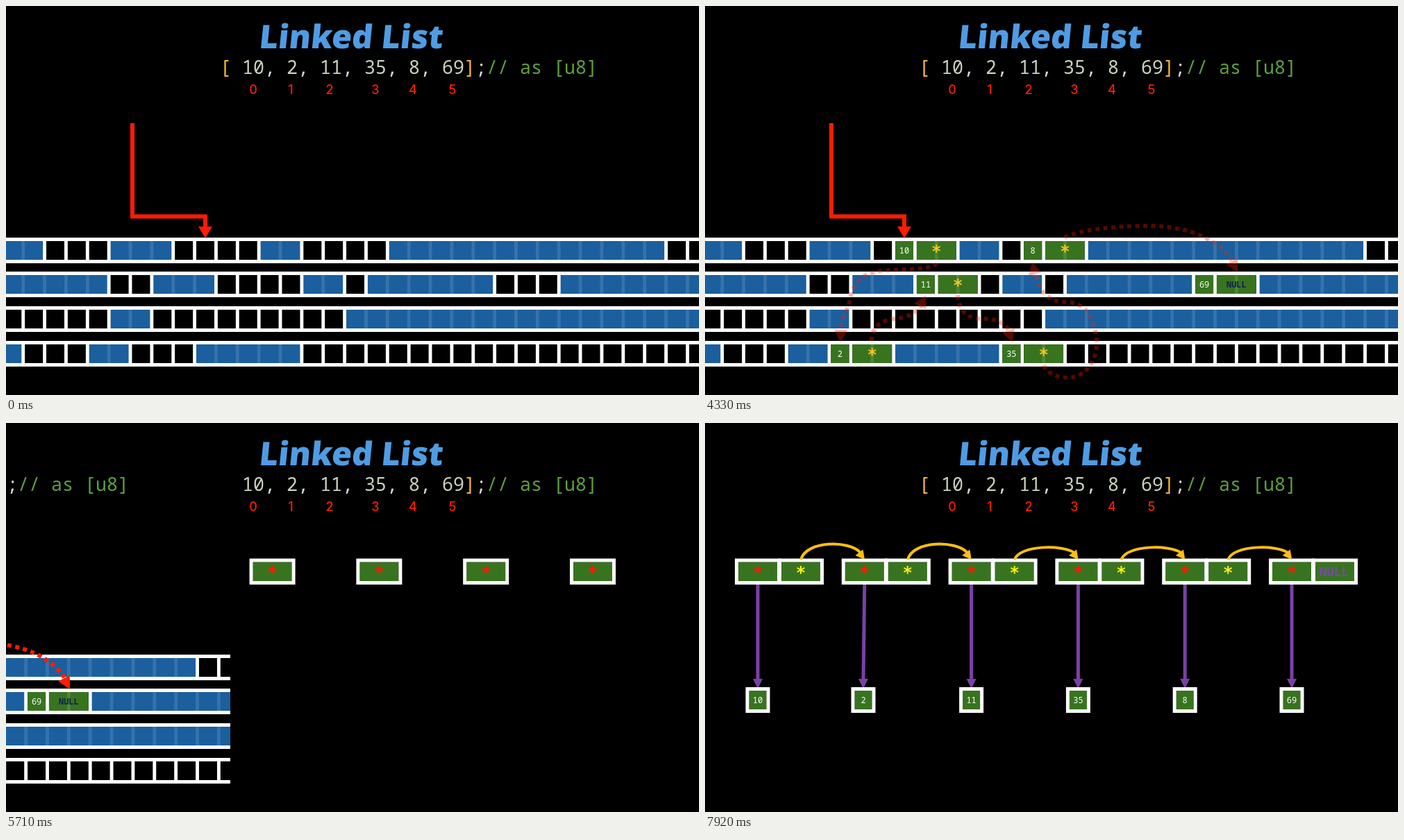
An HTML page with a canvas for the animation above (8000 ms loop, 998 by 561 pixels).

```html
<!DOCTYPE html>
<html lang="en">
<head>
<meta charset="utf-8">
<title>Linked List</title>
<style>
html, body { margin: 0; height: 100%; overflow: hidden; background: #000; }
canvas { display: block; }
</style>
</head>
<body>
<canvas id="stage" width="998" height="561"></canvas>
<script>
const W = 998, H = 561, LOOP = 8000, FADE = 400;
const ctx = document.getElementById('stage').getContext('2d');
const MONO = '"Noto Sans Mono", "DejaVu Sans Mono", monospace';
const RED = '#ff1c02', GREEN = '#38741f', BLUE = '#1b5f9e', PURPLE = '#7b40a8', GOLD = '#ffbf10';
const VALUES = [10, 2, 11, 35, 8, 69];

const clamp = v => Math.max(0, Math.min(1, v));
const fade = (t, start) => clamp((t - start) / FADE);

function rect(x, y, w, h, color) {
  ctx.fillStyle = color;
  ctx.fillRect(x, y, w, h);
}

function text(str, x, y, font, color, align = 'center') {
  ctx.font = font;
  ctx.fillStyle = color;
  ctx.textAlign = align;
  ctx.fillText(str, x, y);
}

const star = (x, y, color) => text('*', x, y + 12, 'bold 24px "DejaVu Sans Mono", monospace', color);
const value = (v, x, y) => text(v, x, y, `12px ${MONO}`, '#fff');

function line(path, color, width, dash = []) {
  ctx.strokeStyle = color;
  ctx.lineWidth = width;
  ctx.setLineDash(dash);
  ctx.stroke(new Path2D(path));
}

// Triangle with its tip at x, y, pointing along the angle in degrees
function head(x, y, angle, length, width, color) {
  ctx.save();
  ctx.translate(x, y);
  ctx.rotate(angle * Math.PI / 180);
  ctx.fillStyle = color;
  ctx.fill(new Path2D(`M0,0 L${-length},${-width / 2} V${width / 2}Z`));
  ctx.restore();
}

function withAlpha(alpha, draw) {
  if (!alpha) return;
  ctx.globalAlpha = alpha;
  draw();
  ctx.globalAlpha = 1;
}

// Title, array literal and its indices, shared by both slides
function header() {
  ctx.save();
  ctx.transform(1, 0, -0.1, 1, 496, 61);
  text('Linked List', 0, 0, '800 47px "Open Sans", "Noto Sans", sans-serif', '#4f9ce4');
  ctx.restore();
  const code = '[ 10, 2, 11, 35, 8, 69];// as [u8]';
  [...code].forEach((ch, i) => {
    const color = i > 23 ? '#5da13d' : '[]'.includes(ch) ? '#fdb827'
      : /\d/.test(ch) ? '#cad4bf' : '#d8d8d8';
    text(ch, 308 + 16 * i, 98, `26.67px ${MONO}`, color, 'left');
  });
  [356, 410, 466, 532, 586, 643].forEach((x, i) =>
    text(i, x, 127, '500 18px Inter, sans-serif', RED));
}

// Memory rows: alternating run lengths, used (blue) first, then free (black)
const ROWS = [
  { y: 334, runs: [2, 3, 3, 4, 2, 4, 13, 2] },
  { y: 383, runs: [5, 2, 3, 4, 2, 1, 6, 3, 7] },
  { y: 433, runs: [0, 5, 2, 9, 17] },
  { y: 483, runs: [1, 3, 2, 3, 5, 19] }
];
const PITCH = 30.86, CELL = 26;
const cellX = i => -3.7 + PITCH * i;

function block(row, i, n, color) {
  const y = ROWS[row].y + 5;
  rect(cellX(i), y, PITCH * (n - 1) + CELL, 27, color);
  for (let k = 1; k < n; k++)
    rect(cellX(i + k) - PITCH + CELL, y, PITCH - CELL, 27, 'rgba(255,255,255,.12)');
}

function memory() {
  ROWS.forEach(({ y, runs }, row) => {
    rect(0, y, W, 37, '#fff');
    let i = 0;
    runs.forEach((n, k) => {
      if (k % 2) for (let c = 0; c < n; c++) block(row, i + c, 1, '#000');
      else if (n) block(row, i, n, BLUE);
      i += n;
    });
  });
}

// Row and first cell of each list node
const NODES = [[0, 9], [3, 6], [1, 10], [3, 14], [0, 15], [1, 23]];

function nodes() {
  NODES.forEach(([row, i], k) => {
    const y = ROWS[row].y, mid = cellX(i + 1) + (PITCH + CELL) / 2;
    block(row, i, 1, GREEN);
    block(row, i + 1, 2, GREEN);
    value(VALUES[k], cellX(i) + CELL / 2, y + 23);
    if (k < 5) star(mid, y + 16, '#ffc617');
    else text('NULL', mid, y + 23, `bold 12px ${MONO}`, '#0c2252');
  });
}

// Path, then tip and angle of the arrow head
const LINKS = [
  ['M334,371 C330,378 305,379 285,380 C250,382 235,382 222,396 C206,412 212,425 203,440 C198,448 196,458 195,466', 195, 485, 92],
  ['M240,483 C240,462 255,452 275,451 C295,448 303,443 311,432', 318, 417, -64],
  ['M364,417 C366,440 378,450 395,451 C415,450 430,455 437,467', 443, 485, 70],
  ['M488,518 C492,530 508,536 522,536 C548,536 566,512 564,480 C560,445 545,428 522,427 C495,427 484,415 476,387', 471, 369, -104],
  ['M518,334 C535,324 585,317 640,317 C700,318 740,338 759,367', 767, 384, 62]
];

function links() {
  for (const [path, x, y, angle] of LINKS) {
    line(path, RED, 6, [6, 5.5]);
    head(x, y, angle, 18, 19, RED);
  }
}

function memorySlide(t) {
  rect(0, 0, W, H, '#000');
  header();
  memory();
  withAlpha(fade(t, 3370), nodes);
  line('M182,169 V303.5 H287 V320', RED, 6);
  head(287, 335, 90, 17, 20, RED);
  withAlpha(fade(t, 4200), links);
}

function box(x, y, w, h) {
  rect(x + 5, y + 5, w - 10, h - 10, GREEN);
  ctx.strokeStyle = '#fff';
  ctx.lineWidth = 5;
  ctx.setLineDash([]);
  ctx.strokeRect(x + 2.5, y + 2.5, w - 5, h - 5);
}

const STEP = 153.8;
const eachNode = draw => VALUES.forEach((v, i) => draw(43 + STEP * i, i, v));

function valueBoxes() {
  eachNode((x, i, v) => {
    const top = x + 33, end = i === 1 ? 228 : top;
    line(`M${top},232 L${end},371`, PURPLE, 5);
    head(end, 383, 90, 14, 14, PURPLE);
    box(end - 17.5, 381, 35, 37);
    value(v, end, 404);
  });
}

function nextBoxes() {
  eachNode((x, i) => {
    box(x + 62, 195.5, 66, 37.5);
    if (i < 5) star(x + 95, 212, '#fff014');
    else text('NULL', x + 94, 221, `bold 17.8px ${MONO}`, '#7a48ad');
  });
}

function nextArrows() {
  eachNode((x, i) => {
    if (i > 4) return;
    const top = i < 2 ? 169 : 175.5;
    line(`M${x + 95},197 C${x + 103},${top} ${x + 165},${top} ${x + 181},187`, GOLD, 4);
    head(x + 187, 197, 52, 13, 14, GOLD);
  });
}

function listSlide(t) {
  rect(0, 0, W, H, '#000');
  header();
  withAlpha(fade(t, 5990), valueBoxes);
  withAlpha(fade(t, 6700), nextBoxes);
  eachNode(x => {
    box(x, 195.5, 66, 37.5);
    star(x + 33, 212, RED);
  });
  withAlpha(fade(t, 7450), nextArrows);
}

// The memory slide slides off to the left, uncovering the list slide
function render(t) {
  const gone = 1 - (1 - clamp((t - 5585.7) / FADE)) ** 3;
  if (gone > 0) listSlide(t);
  if (gone === 1) return;
  ctx.save();
  ctx.translate(Math.round(-W * gone), 0);
  ctx.beginPath();
  ctx.rect(0, 0, W, H);
  ctx.clip();
  memorySlide(t);
  ctx.restore();
}

const begin = performance.now();
function tick() {
  render((performance.now() - begin) % LOOP);
  requestAnimationFrame(tick);
}
tick();
</script>
</body>
</html>
```
